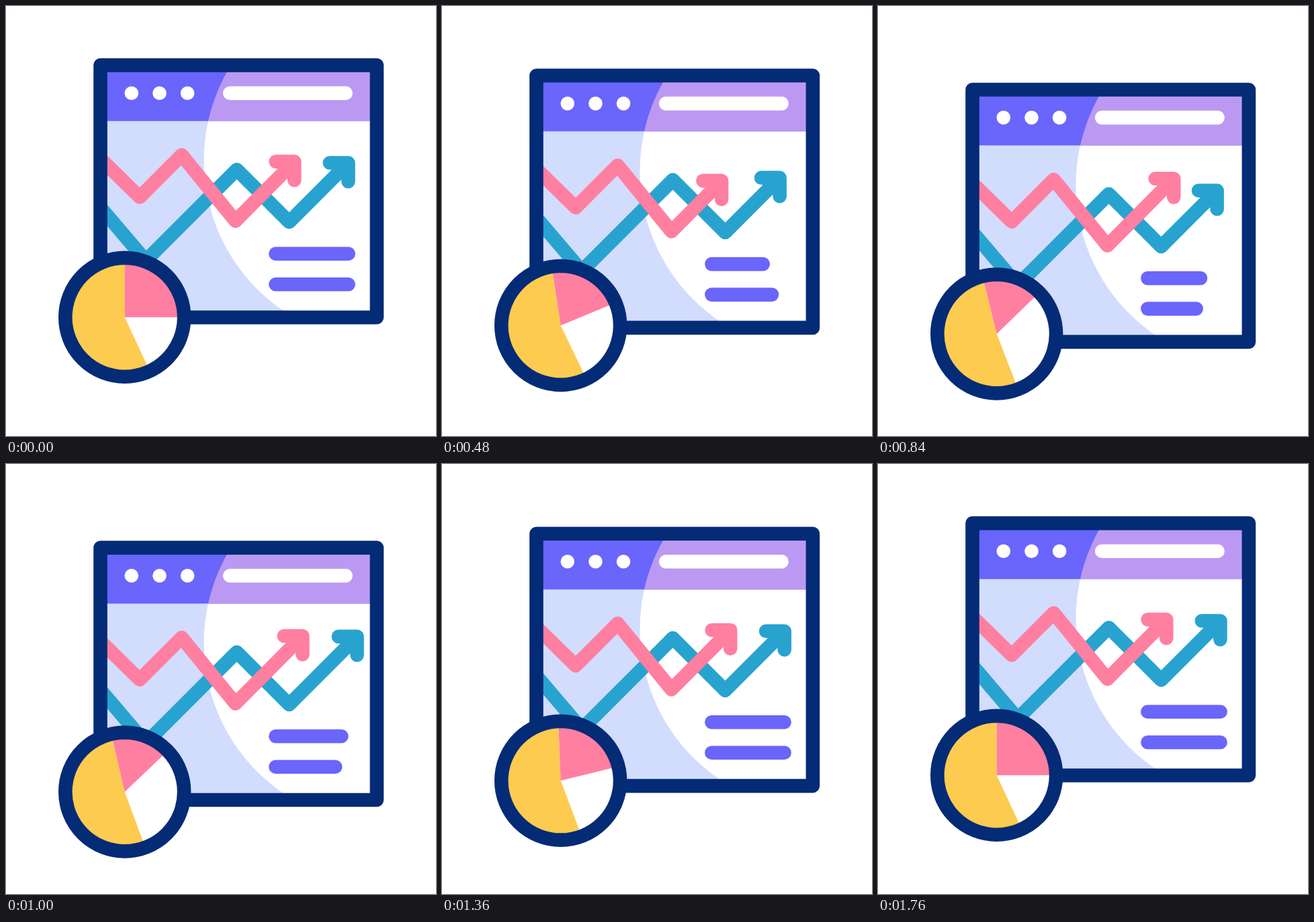
An HTML page for the animation above (1.8 s loop, 640 by 640 pixels).

```html
<!DOCTYPE html>
<html lang="en">
<head>
<meta charset="utf-8">
<title>Chart window</title>
<style>
  html, body { margin: 0; width: 100%; height: 100%; overflow: hidden; background: #fff; }
  svg { display: block; width: 100%; height: 100%; }
  .line { fill: none; stroke-width: 20.6; stroke-linecap: round; stroke-linejoin: round; }
  .navy { stroke: #042b76; }
  .violet { stroke: #6a65fb; }
  .teal { stroke: #28a3cf; }
  .pink { stroke: #ff7fa1; }
</style>
</head>
<body>
<svg viewBox="0 0 640 640">
  <defs>
    <clipPath id="pane"><rect x="141" y="88" width="411" height="376"/></clipPath>
  </defs>
  <g id="window">
    <g clip-path="url(#pane)">
      <rect x="141" y="88" width="411" height="376" fill="#d2dcfd"/>
      <circle cx="564.8" cy="230" r="270.3" fill="#fff"/>
      <clipPath id="header"><rect x="141" y="88" width="411" height="83.2"/></clipPath>
      <g clip-path="url(#header)">
        <rect x="141" y="88" width="411" height="84" fill="#6a65fb"/>
        <circle cx="564.8" cy="230" r="270.3" fill="#bb99f2"/>
      </g>
      <g fill="#fff">
        <circle cx="186.8" cy="129.7" r="10.3"/>
        <circle cx="228.5" cy="129.7" r="10.3"/>
        <circle cx="270.1" cy="129.7" r="10.3"/>
      </g>
      <path class="line" stroke="#fff" d="M333.2 129.7H505.6"/>
      <path class="line teal" id="tealArrow"/>
      <path class="line pink" id="pinkArrow"/>
      <path class="line violet" id="upperBar"/>
      <path class="line violet" id="lowerBar"/>
    </g>
    <rect class="line navy" x="140.5" y="88.1" width="411.4" height="375.4"/>
  </g>
  <g id="pie">
    <circle r="84" fill="#fff"/>
    <path id="yellowSlice" fill="#fdcb50"/>
    <path id="pinkSlice" fill="#ff7fa1"/>
    <circle class="line navy" r="88.4"/>
  </g>
</svg>
<script>
const LOOP = 1800;
const el = id => document.getElementById(id);
const put = (id, d) => el(id).setAttribute('d', d);

const ease = x => x * x * (3 - 2 * x);

// Eased value through [time, value] keys, held outside them.
function track(t, keys) {
  if (t <= keys[0][0]) return keys[0][1];
  for (let i = 1; i < keys.length; i++) {
    const [t0, a] = keys[i - 1], [t1, b] = keys[i];
    if (t < t1) return a + (b - a) * ease((t - t0) / (t1 - t0));
  }
  return keys[keys.length - 1][1];
}

// Rise to a peak, stay, and return to zero.
const pulse = (t, peak, [up, top, leave, end]) =>
  track(t, [[up, 0], [top, peak], [leave, peak], [end, 0]]);

// Pull back, shoot ahead, settle.
const thrust = t =>
  track(t, [[175, 0], [535, -14], [590, -14], [905, 14], [925, 14], [1260, 0]]);

function arrow(id, start, x, y, shift) {
  x += shift;
  y -= shift;
  put(id, `M${start}L${x} ${y}M${x - 27.6} ${y}H${x}V${y + 27.6}`);
}

function slice(id, from, to) {
  const point = deg => {
    const a = deg * Math.PI / 180;
    return `${84 * Math.sin(a)} ${-84 * Math.cos(a)}`;
  };
  put(id, `M0 0L${point(from)}A84 84 0 ${to - from > 180 ? 1 : 0} 1 ${point(to)}Z`);
}

function bar(id, y, shrink) {
  put(id, `M401.4 ${y}H${509.6 - shrink}`);
}

function draw(t) {
  const windowY = pulse(t, 36.5, [172, 862, 1041, 1624]);
  const pieY = pulse(t, 24.7, [148, 822, 1006, 1578]);
  el('window').setAttribute('transform', `translate(0 ${windowY})`);
  el('pie').setAttribute('transform', `translate(176.7 ${463.3 + pieY})`);

  arrow('tealArrow', '130 287.5L208 379L343.5 243.5L421.5 321.5', 509.4, 233.5, thrust(t - 130));
  arrow('pinkArrow', '130 216.8L199 284.5L261.5 221.8L341.5 320', 429.2, 231.6, thrust(t));

  bar('upperBar', 368.7, pulse(t, 43, [169, 637, 649, 1165]));
  bar('lowerBar', 414.2, pulse(t, 40.5, [258, 730, 732, 1256]));

  const squeeze = pulse(t, 48.5, [120, 890, 975, 1635]);
  const turn = track(t, [[100, 0], [490, -.6], [960, 4.7], [1280, 4.7], [1780, 0]]);
  const top = turn - .37 * squeeze;
  slice('yellowSlice', 155 + turn, 360 + top);
  slice('pinkSlice', top, 90 + turn - squeeze);
}

const begin = performance.now();
function tick() {
  draw((performance.now() - begin) % LOOP);
  requestAnimationFrame(tick);
}
tick();
</script>
</body>
</html>
```
